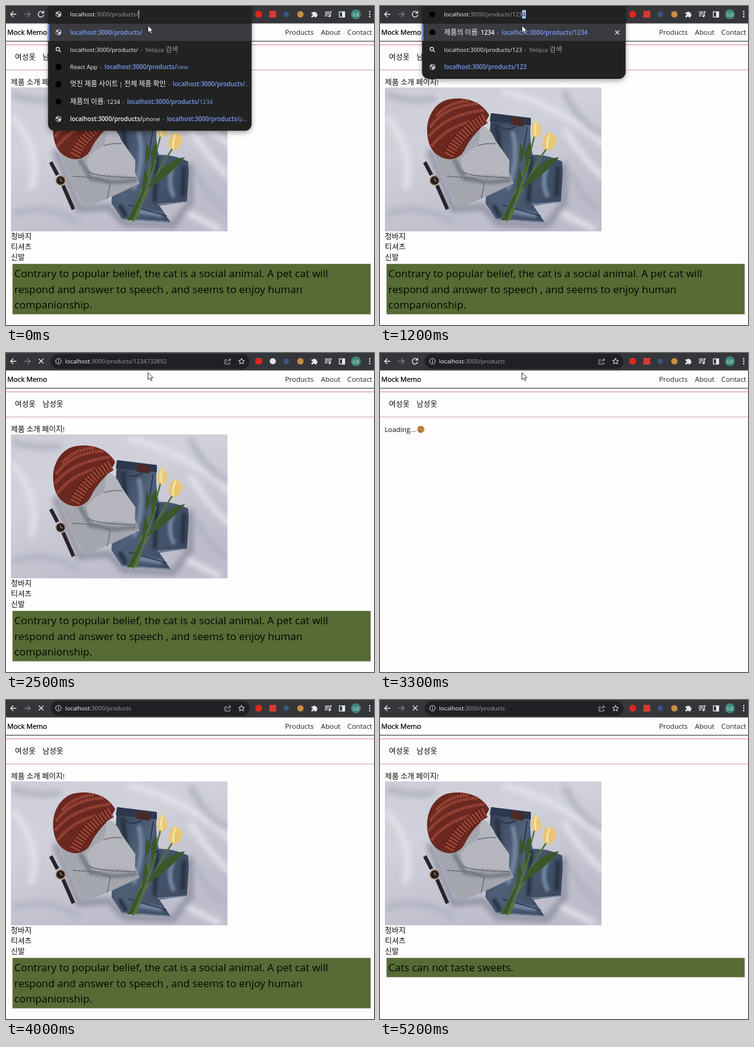
Animation, 600 px wide and 521 px high, one loop 5.3 s. Source, as an HTML page:

```html
<!DOCTYPE html>
<html lang="ko">
<head>
<meta charset="utf-8">
<title>Product page</title>
<style>
html, body { margin: 0; width: 100%; height: 100%; overflow: hidden; background: #fffdfe; }
svg { display: block; }
text { font: 11.3px "Open Sans", "Noto Sans CJK KR", "Noto Sans CJK", sans-serif; fill: #0a0a0a; white-space: pre; }
.ko { font-family: "Noto Sans CJK KR", "Noto Sans CJK", sans-serif; font-size: 1.08em; }
.menu text { fill: #222; }
.ui text { font-size: 9.55px; fill: #f4f5f7; }
.ui .ko { font-size: 1.19em; }
.ui .host { fill: #fff; font-weight: 500; }
.ui .dim { fill: #9aa0a6; }
.ui .link { fill: #7a9df2; }
.ui .bold { font-weight: 600; font-size: 1.03em; }
.fact { font-size: 16.96px; fill: #050602; }
.line { fill: none; stroke: #e8eaed; stroke-width: 1.3; }
</style>
</head>
<body>
<svg width="600" height="521" viewBox="0 0 600 521">
<defs>
  <linearGradient id="sheet" x2=".5" y2="1">
    <stop offset="0" stop-color="#cdced7"/><stop offset=".4" stop-color="#d0d1da"/>
    <stop offset="1" stop-color="#bcbccb"/>
  </linearGradient>
  <linearGradient id="denim" x2="1" y2=".6">
    <stop offset="0" stop-color="#2f3a4c"/><stop offset=".45" stop-color="#4f6079"/><stop offset="1" stop-color="#3d4a60"/>
  </linearGradient>
  <pattern id="knit" width="3.2" height="3.2" patternUnits="userSpaceOnUse" patternTransform="rotate(-24)">
    <rect width="3.2" height="3.2" fill="#b4b5bc"/><rect width="3.2" height="1.2" fill="#8b8d96"/>
  </pattern>
  <pattern id="cuff" width="3.2" height="3.2" patternUnits="userSpaceOnUse" patternTransform="rotate(18)">
    <rect width="3.2" height="3.2" fill="#bfc0c6"/><rect width="1.1" height="3.2" fill="#a2a4ac"/>
  </pattern>
  <filter id="soft" x="-20%" y="-20%" width="140%" height="140%"><feGaussianBlur stdDeviation="5"/></filter>
  <filter id="fold" x="-20%" y="-20%" width="140%" height="140%"><feGaussianBlur stdDeviation="2"/></filter>
  <filter id="shade" x="-10%" y="-10%" width="120%" height="130%"><feDropShadow dx="0" dy="3" stdDeviation="4" flood-opacity=".35"/></filter>
  <clipPath id="frame"><rect x="8" y="133" width="353" height="235"/></clipPath>

  <g id="globe">
    <circle r="4.8" fill="#c4c7cb"/>
    <path d="M-4-1L-1 0L0 2L-1 4.200Q-4 3-4-1M-1-4L3.500-2.500L2.500 0L.5-1L-1-2Z" fill="#34363a"/>
  </g>
  <g id="lens" class="line"><circle cx="-1" cy="-1" r="2.800"/><path d="M1 1L4 4"/></g>
  <circle id="dot" r="5" fill="#000"/>
  <g id="info" class="line" style="stroke-width:1"><circle r="4.500"/><path d="M0-.6V2.500M0-2.500V-1.400"/></g>
</defs>

<rect width="600" height="521" fill="#fffdfe"/>
<text x="2" y="47" stroke="#000" stroke-width=".3">Mock Memo</text>
<g class="menu"><text x="455" y="47">Products</text><text x="513.500" y="47">About</text><text x="556.500" y="47">Contact</text></g>
<rect y="57" width="600" height="1" fill="#2a2a2a"/>
<rect y="63" width="600" height="1" fill="#dc8787"/>
<rect y="104" width="600" height="1" fill="#d0a09c"/>
<text x="14.500" y="88" class="kr">여성옷</text><text x="59.500" y="88" class="kr">남성옷</text>

<g id="wait">
  <text x="7.500" y="128.500">Loading...</text>
  <circle cx="66.500" cy="124.800" r="6" fill="#c98f45"/>
  <path d="M63 122h2M68 122.500h2M65 126h1.500M68.500 126.500h1M64 128.500h2" stroke="#5e3714" stroke-width="1.500"/>
</g>

<g id="content">
  <text x="8" y="128.500" class="kr">제품 소개 페이지!</text>
  <g clip-path="url(#frame)">
    <rect x="8" y="133" width="353" height="235" fill="url(#sheet)"/>
    <g filter="url(#soft)" fill="none" stroke-width="10">
      <path d="M200 140Q290 160 370 230M300 200Q330 250 365 280M10 180Q60 240 40 300M290 335L350 365" stroke="#e2e2ea"/>
      <path d="M10 145Q60 160 90 150M300 140Q330 200 365 210M10 340Q70 320 120 355M310 270Q330 320 365 335" stroke="#b2b3c2"/>
      <path d="M80 235L120 332L168 328L192 354L272 358L300 322L300 256" stroke="#8f90a0"/>
    </g>

    <!-- jeans -->
    <path d="M181 175L246 183Q243 215 249 243Q275 243 297 254L298 272L295 320L250 326L269 354L190 349L172 322Z" fill="url(#denim)"/>
    <g filter="url(#fold)" fill="none" stroke-width="7">
      <path d="M216 205Q228 250 208 300M272 262Q262 290 274 312M215 335L255 342" stroke="#7488a3"/>
      <path d="M247 245L242 320M190 195L196 240M185 325L196 345M290 262L288 310" stroke="#263143"/>
    </g>
    <path d="M181 175L246 183L246 195L179 188Z" fill="#2b384d"/>
    <path d="M240 198L232 250M190 193Q205 208 222 196M200 325L262 343" fill="none" stroke="#273246" stroke-width="1.600"/>
    <path d="M248 324l47-4M190 348l78 5" stroke="#8c9cb2" stroke-width="2" stroke-dasharray="3 1"/>
    <path d="M214 181L235 184L234 197L213 194Z" fill="#4b2a26"/>

    <!-- sweater -->
    <path d="M86 236L140 200L165 194L186 215L218 290L165 315L127 329L108 290Z" fill="url(#knit)"/>
    <path d="M120 250L138 282L180 288L214 284" fill="none" stroke="#5d606a" stroke-opacity=".6" stroke-width="7" filter="url(#fold)"/>
    <path d="M132 250Q146 232 160 228L165 194Q180 199 188 219L211 252L210 280Q180 272 146 277Q132 270 132 250Z" fill="url(#cuff)"/>
    <path d="M133 270Q150 280 211 280M108 278L150 281L170 290L165 315M160 228Q175 223 189 225" fill="none" stroke="#6d7079" stroke-width="1.500"/>

    <!-- hat -->
    <path d="M78 216C72 185 89 155 115 152C141 148 166 157 178 178C170 198 152 207 139 233C130 253 110 253 98 246C88 241 80 230 78 216Z" fill="#6b2820"/>
    <path d="M82 198Q106 162 160 160M80 213Q108 177 170 170M84 229Q110 194 167 184M92 180Q110 157 145 155" fill="none" stroke="#984435" stroke-width="5" stroke-dasharray="4 1"/>
    <path d="M171 183Q132 204 112 244" fill="none" stroke="#4f1c17" stroke-width="19"/>
    <path d="M171 183Q132 204 112 244" fill="none" stroke="#984233" stroke-width="17" stroke-dasharray="3.500 2"/>

    <!-- tulips -->
    <path d="M252 211Q242 260 199 350M272 232Q242 276 207 352M245 250L212 350" fill="none" stroke="#557339" stroke-width="2.600"/>
    <path d="M229 224Q224 255 232 284Q244 250 229 224M292 247Q257 250 229 300Q264 280 292 247M245 222Q250 251 222 304Q224 252 245 222M215 315L198 350L207 350L230 290Z" fill="#3b5729"/>
    <path d="M248 212Q244 196 254 187Q266 197 262 210Q255 217 248 212Z" fill="#e9c978"/>
    <path d="M265 230Q264 212 275 206Q286 208 288 219Q284 235 274 236Z" fill="#e8c674"/>
    <path d="M255 190Q251 200 254 212M277 209Q271 220 273 233" fill="none" stroke="#f5e3aa" stroke-width="3"/>

    <!-- watch -->
    <path d="M73 255L84 276M93 293L110 332" stroke="#27242a" stroke-width="6"/>
    <circle cx="89" cy="285" r="7.500" fill="#241f22" stroke="#a98362" stroke-width="1.600"/>
    <path d="M89 281v4l3 1" fill="none" stroke="#d2b28e"/>
  </g>
  <text x="8" y="381" class="kr">청바지</text>
  <text x="8" y="397.800" class="kr">티셔츠</text>
  <text x="8" y="414.600" class="kr">신발</text>
  <g id="fact"></g>
</g>

<g class="ui">
  <rect width="600" height="28.500" fill="#35363a"/>
  <path d="M17 13.500H8M12 9L7.500 13.500L12 18" class="line"/>
  <path d="M30 13.500H39M35 9L39.500 13.500L35 18" class="line" style="stroke:#7b7e82"/>
  <path id="reload" d="M60.500 10.500A4.500 4.500 0 1 0 61.500 14.500M61.500 8V11.500H58" class="line"/>
  <path id="stop" d="M53.500 9.500L61 17M61 9.500L53.500 17" class="line"/>

  <circle cx="412" cy="13.500" r="5.800" fill="#d8291c"/>
  <rect id="devTool" x="429.500" y="8" width="11" height="11" fill="#d63a32"/>
  <circle id="prodTool" cx="435" cy="13.500" r="5" fill="#dfe3e6"/>
  <circle cx="457" cy="13.500" r="4.500" fill="#3a5484"/>
  <circle cx="480" cy="13.500" r="5.200" fill="#c98d43"/>
  <path d="M498 10.500H501A1.500 1.500 0 1 1 504 10.500H506.500V13A1.500 1.500 0 1 1 506.500 16V18.500H503.500A1.500 1.500 0 1 0 500.500 18.500H498V15.500A1.500 1.500 0 1 0 498 12.800Z" fill="#e8eaed"/>
  <path d="M520 10H527.500M520 13H527.500M520 16H524M529 16.500V9.500H531" class="line"/>
  <circle cx="527.500" cy="16.500" r="1.700" fill="#e8eaed"/>
  <rect x="543.500" y="9.500" width="8.500" height="8.500" class="line"/>
  <rect x="548" y="9" width="4.500" height="9.500" fill="#e8eaed"/>
  <circle cx="570.500" cy="13.500" r="8" fill="#3f877b"/>
  <text x="570.500" y="15.800" text-anchor="middle" style="font-size:6px">도담</text>
  <g fill="#e8eaed"><circle cx="593" cy="9.500" r="1.200"/><circle cx="593" cy="13.500" r="1.200"/><circle cx="593" cy="17.500" r="1.200"/></g>

  <g id="pill">
    <rect x="73" y="1.500" width="324" height="24.500" rx="12.200" fill="#202124"/>
    <use href="#info" x="85.500" y="13.500"/>
    <text x="96.500" y="17"><tspan class="host">localhost</tspan><tspan class="dim" id="address"></tspan></text>
    <path d="M360 11H357V18H365V15M359.500 15Q360.500 11 366 11M363.500 8.500L366.500 11L363.500 13.500" class="line" style="stroke:#b9bcc0;stroke-width:1"/>
    <path d="M384 8.500L385.400 12L389 12.200L386.200 14.500L387.200 18L384 16L380.800 18L381.800 14.500L379 12.200L382.600 12Z" class="line" style="stroke-width:1"/>
  </g>
  <g id="edit"></g>
</g>
<path id="mouse" d="M231.500 32V43.500L234.200 41L236 45.200L238 44.300L236.200 40.300H239.700Z" fill="#fff" stroke="#222" stroke-width=".9"/>
</svg>

<script>
const LOOP = 5300;
const DIGITS = '1234732892';
const KEYS = [300, 600, 900, 1300, 1500, 1600, 1800, 2000, 2200, 2300];
const ENTER = 2400, REDIRECT = 2700, READY = 3400;
const LONG = [
  'Contrary to popular belief, the cat is a social animal. A pet cat will',
  'respond and answer to speech , and seems to enjoy human',
  'companionship.'
];
// Each entry holds until the next one; no lines means still loading.
const FACTS = [
  [0, LONG], [READY, []],
  [3500, ['Mother cats teach their kittens to use the litter box.']],
  [3800, []], [4000, LONG], [4200, []],
  [4500, ['Cats can not taste sweets.']]
];
const HOST = 'localhost', PATH = ':3000/products/', URL_TEXT = HOST + PATH;
const ROW = 28.3, LINE = 25.4;

const $ = id => document.getElementById(id);
const show = (id, on) => $(id).style.display = on ? '' : 'none';
const korean = s => s.replace(/[가-힣]+/g, '<tspan class="ko">$&</tspan>');
const span = (cls, s, dx = 0) => `<tspan class="${cls}" dx="${dx}">${korean(s)}</tspan>`;
const dash = span('dim', '-', 3.9);
const link = (s, tail = '') => span('link bold', s, 4.5) + span('link', tail);
const icon = (name, y) => `<use href="#${name}" x="85.500" y="${y}"/>`;

document.querySelectorAll('.kr').forEach(el => el.innerHTML = korean(el.textContent));

const search = s => ['lens', span('', s) + dash + span('dim', 'Velqua 검색', 4.5)];

function suggestions(n) {
  const typed = URL_TEXT + DIGITS.slice(0, n);
  const own = ['globe', span('link bold', typed)];
  if (n === 0) return [
    own, search(typed),
    ['dot', span('', 'React App') + dash + link(URL_TEXT, 'new')],
    ['dot', span('', '멋진 제품 사이트 | 전체 제품 확인') + dash + link(URL_TEXT, '...')],
    ['dot', span('', '제품의 이름: 1234') + dash + link(URL_TEXT, '1234')],
    ['globe', span('bold', URL_TEXT) + span('', 'phone') + dash + link(URL_TEXT, 'p...')]
  ];
  if (n > 4) return [own, search(typed)];
  const match = ['dot', span('', '제품의 이름: ') + span('bold', '1234') + dash + link(URL_TEXT + '1234')];
  return n < 4 ? [match, search(typed), own] : [match, search(typed)];
}

function drawEdit(n) {
  const rows = suggestions(n);
  const matched = n > 0 && n <= 4;
  const rest = matched ? DIGITS.slice(n, 4) : '';
  const bottom = 34 + rows.length * ROW;
  $('edit').innerHTML =
    `<rect x="68.500" y="-14" width="332" height="${bottom + 14}" rx="11" fill="#202124" filter="url(#shade)"/>
     <rect x="68.500" y="29" width="332" height="28" fill="#3a3a40"/>
     <rect x="68.500" y="29" width="2" height="28" fill="#7a9df2"/>` +
    icon(matched ? 'dot' : 'globe', 13.5) +
    `<text id="typed" x="104.500" y="17">${span('host', HOST)}${span('dim', PATH + DIGITS.slice(0, n))}</text>` +
    rows.map(([name, body], i) => {
      const y = 43 + i * ROW;
      return icon(name, y) + `<text x="104.500" y="${y + 3.5}">${body}</text>`;
    }).join('') +
    (matched ? '<path d="M383.500 40L390 46.500M390 40L383.500 46.500" class="line"/>' : '');
  const end = 104.5 + $('typed').getComputedTextLength();
  const tail = rest
    ? `<rect x="${end}" y="6.500" width="${rest.length * 5.45 + .6}" height="14" fill="#a3c5f3"/>
       <text x="${end}" y="17" style="fill:#26303d">${rest}</text>`
    : `<rect x="${end + .5}" y="7" width="1" height="13" fill="#e8eaed"/>`;
  $('edit').insertAdjacentHTML('beforeend', tail);
}

function drawFact(lines) {
  const top = lines.length ? 421.2 : 438.2;
  $('fact').innerHTML =
    `<rect x="10.600" y="${top}" width="584" height="${6.1 + lines.length * LINE}" fill="#566b35"/>` +
    (lines.length ? '' : '<text x="7.500" y="431">Loading....</text>') +
    lines.map((s, i) => `<text class="fact" x="13.600" y="${443.3 + i * LINE}">${s}</text>`).join('');
}

let last = '';
function render(t) {
  const typed = KEYS.filter(k => k <= t).length;
  const factNo = FACTS.filter(f => f[0] <= t).length - 1;
  const editing = t < ENTER;
  const moving = t >= ENTER && t < REDIRECT;
  const waiting = t >= REDIRECT && t < READY;
  const busy = moving || t >= 3600;
  const pointer = t < 3800;
  const state = [typed, factNo, editing, moving, waiting, busy, pointer].join();
  if (state === last) return;
  last = state;

  show('edit', editing);
  show('pill', !editing);
  show('wait', waiting);
  show('content', !waiting);
  show('stop', busy);
  show('reload', !busy);
  show('prodTool', moving);
  show('devTool', !moving);
  show('mouse', pointer);
  $('address').textContent = moving ? PATH + DIGITS : PATH.slice(0, -1);
  if (editing) drawEdit(typed);
  drawFact(FACTS[factNo][1]);
}

const start = performance.now();
function tick() {
  render((performance.now() - start) % LOOP);
  requestAnimationFrame(tick);
}
tick();
</script>
</body>
</html>
```
